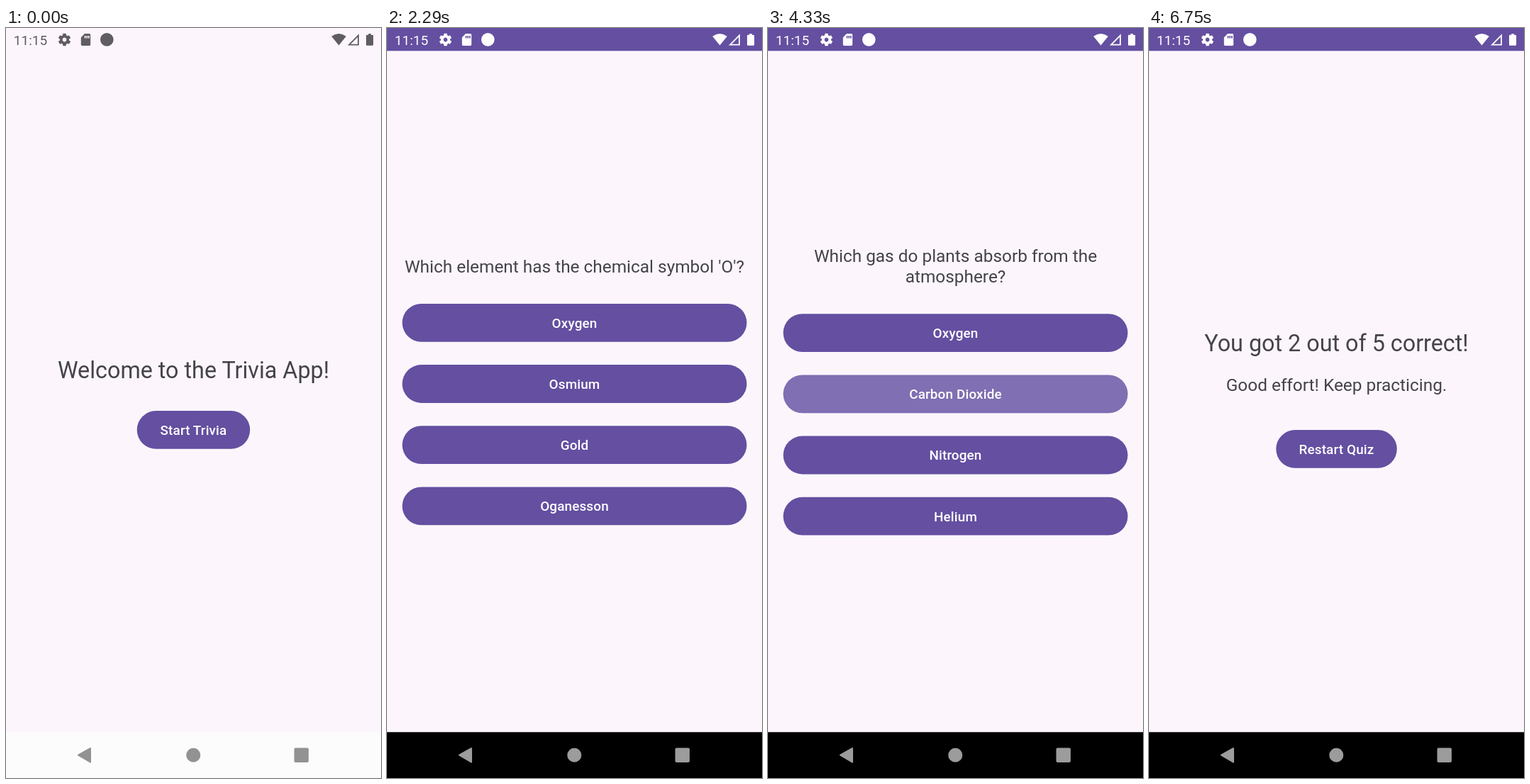
Recreate the animation shown at these times as an HTML page. Size 529 px wide and 1058 px high, loop 6.79 s.

```html
<!DOCTYPE html>
<html lang="en">
<head>
<meta charset="utf-8">
<title>Trivia</title>
<style>
  html, body { margin: 0; width: 100%; height: 100%; overflow: hidden; background: #000; }
  svg { display: block; width: 100%; height: 100%; }
  text { font-family: Roboto, sans-serif; fill: #45424b; text-anchor: middle; }
  .big { font-size: 32.3px; }
  .mid { font-size: 24.4px; }
  .label { font-size: 18.9px; font-weight: 500; letter-spacing: .007em; fill: #fff; }
</style>
</head>
<body>
<svg viewBox="0 0 529 1058">
  <g id="screens"></g>
  <g id="status">
    <text x="10.8" y="23.6" style="font-size:19px;text-anchor:start;fill:inherit">11:15</text>
    <g id="gear" transform="translate(82.5 16.5)">
      <circle r="4.8" fill="none" stroke="currentColor" stroke-width="3.8"/>
    </g>
    <path d="M111 8h6.5q1.7 0 1.7 1.7v13.6q0 1.7-1.7 1.7h-10q-1.7 0-1.7-1.7V13.2zM110.7 11v3.6h1.7V11zM113.4 11v3.6h1.7V11zM116 11v3.6h1.7V11z" fill-rule="evenodd"/>
    <circle cx="142.3" cy="16.4" r="9.3"/>
    <path d="M469.5 24.5L459.2 11.7Q469.5 4.300 479.8 11.7z"/>
    <path d="M484 23.600L497 10.500V23.600z" fill="none" stroke="currentColor" stroke-width="1.8"/>
    <path d="M511.300 8h3.500v1.700h2q1.300 0 1.300 1.300v12.500q0 1.300-1.300 1.300h-7.500q-1.300 0-1.300-1.300V11q0-1.300 1.300-1.300h2z"/>
  </g>
  <g id="nav">
    <path d="M102 1025.700L119 1016V1035.700z" stroke="currentColor" stroke-width="2" stroke-linejoin="round"/>
    <circle cx="264.300" cy="1025.700" r="10"/>
    <rect x="406.500" y="1015.500" width="20.400" height="20.500" rx="2"/>
  </g>
</svg>
<script>
const LOOP = 6790, CX = 264.5, CY = 529;
const PURPLE = '#644fa1', PAPER = '#fcf6fc';
const QUIZ_AT = 1796, SECOND_AT = 2560, THIRD_AT = 3700, RESULT_AT = 5247, TAP_AT = 4270;
const $ = id => document.getElementById(id);
const clamp = v => Math.max(0, Math.min(1, v));

const rect = (x, y, w, h, fill, more = '') =>
  `<rect x="${x}" y="${y}" width="${w}" height="${h}" fill="${fill}" ${more}/>`;
const text = (s, y, cls) => `<text class="${cls}" x="${CX}" y="${y}">${s}</text>`;
const button = (s, y, w, extra = '') =>
  rect(CX - w / 2, y, w, 53.8, PURPLE, 'rx="26.9"') + extra + text(s, y + 33.7, 'label');
const page = (body, bar, foot) =>
  rect(0, 0, 529, 1058, PAPER) + rect(0, 0, 529, 32.3, bar) + rect(0, 993.3, 529, 64.7, foot) + body;
const darkPage = body => page(body, PURPLE, '#000');

function quiz(lines, answers, tapped) {
  const shift = (lines.length - 1) * 14.3;
  return darkPage(
    lines.map((s, i) => text(s, 344.5 - shift + i * 28.6, 'mid')).join('') +
    answers.map((s, i) => {
      const y = 388.9 + shift + i * 86.2;
      const glow = i === tapped ? rect(21.5, y, 486, 53.8, '#fff', 'id="glow" rx="26.9"') : '';
      return button(s, y, 486, glow);
    }).join(''));
}

$('screens').innerHTML = [
  page(text('Welcome to the Trivia App!', 493.5, 'big') + button('Start Trivia', 540, 159.5), PAPER, '#fcfcfd'),
  quiz(["Which element has the chemical symbol 'O'?"], ['Oxygen', 'Osmium', 'Gold', 'Oganesson']),
  quiz(['Which planet is closest to the Sun?'], ['Earth', 'Venus', 'Mercury', 'Mars']),
  quiz(['Which gas do plants absorb from the', 'atmosphere?'], ['Oxygen', 'Carbon Dioxide', 'Nitrogen', 'Helium'], 1),
  darkPage(text('You got 2 out of 5 correct!', 455.5, 'big') + text('Good effort! Keep practicing.', 511.5, 'mid') +
    button('Restart Quiz', 567, 170.5))
].map(s => `<g>${s}</g>`).join('');
const screens = [...$('screens').children];

for (let a = 0; a < 360; a += 60)
  $('gear').innerHTML += `<rect x="-2.3" y="-8.7" width="4.6" height="4" rx=".6" transform="rotate(${a})"/>`;

// Two joined cubic curves: a quick start, then a very slow settling
function ease(x) {
  const cubic = (s, a, b, c, d) =>
    (1 - s) ** 3 * a + 3 * (1 - s) ** 2 * s * b + 3 * (1 - s) * s * s * c + s ** 3 * d;
  const early = x < 1 / 6;
  const xs = early ? [0, .05, .1333, 1 / 6] : [1 / 6, .2083, .25, 1];
  const ys = early ? [0, 0, .06, .4] : [.4, .82, 1, 1];
  let lo = 0, hi = 1;
  for (let i = 0; i < 24; i++) {
    const m = (lo + hi) / 2;
    if (cubic(m, ...xs) < x) lo = m; else hi = m;
  }
  return cubic(lo, ...ys);
}

function show(i, scale = 1, opacity = 1) {
  const g = screens[i];
  g.style.display = '';
  g.setAttribute('transform', `translate(${CX} ${CY}) scale(${scale}) translate(${-CX} ${-CY})`);
  g.setAttribute('opacity', opacity);
}

function open(from, to, age) {
  const p = ease(clamp(age / 400));
  if (age < 400) show(from, 1 + .05 * p, 1 - .52 * clamp((age - 100) / 100));
  show(to, .85 + .15 * p, clamp((age - 30) / 83));
}

function tint(id, r, g, b) {
  $(id).style.fill = $(id).style.color = `rgb(${r},${g},${b})`;
}

function draw(t) {
  for (const g of screens) g.style.display = 'none';
  if (t < QUIZ_AT) show(0);
  else if (t < SECOND_AT) open(0, 1, t - QUIZ_AT);
  else if (t < THIRD_AT) show(2);
  else if (t < RESULT_AT) show(3);
  else open(3, 4, t - RESULT_AT);

  $('glow').setAttribute('opacity', .18 * clamp((t - TAP_AT) / 50) * clamp((4650 - t) / 170));

  const k = clamp((t - QUIZ_AT) / 100);
  tint('status', 95 + 160 * k, 92 + 163 * k, 98 + 157 * k);
  const grey = 146 + 10 * k + 75 * Math.sin(Math.PI * k);
  tint('nav', grey, grey, grey);
}

function tick() {
  draw(performance.now() % LOOP);
  requestAnimationFrame(tick);
}
tick();
</script>
</body>
</html>
```
